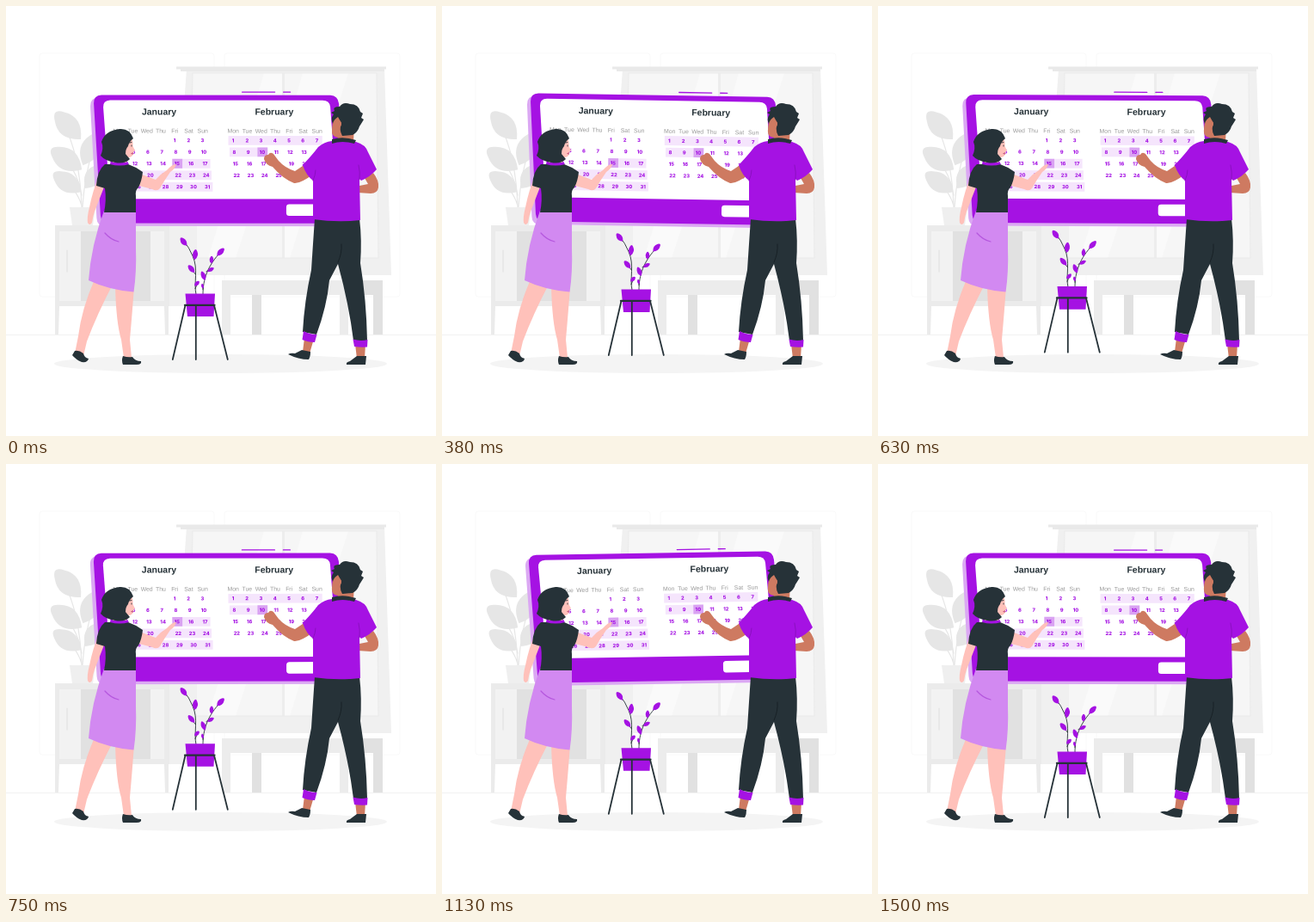
These frames come from a looping animation (500 px wide and 500 px high, 1540 ms). An HTML page:

```html
<!DOCTYPE html>
<html lang="en">
<head>
<meta charset="utf-8">
<title>Calendar planning</title>
<style>
  html, body { margin: 0; width: 100%; height: 100%; overflow: hidden; background: #fff; }
  svg { display: block; width: 100vw; height: 100vh; }
  text { font-family: Arial, "Liberation Sans", sans-serif; text-anchor: middle; }
  .title { font-size: 10.5px; font-weight: 700; fill: #263238; }
  .day { font-size: 6.9px; fill: #999; }
  .num { font: 800 5.8px Inter, Arial, sans-serif; fill: #a512e3; }
  .main { fill: #a512e3; }
  .dark { fill: #263238; }
  .rose { fill: #ffc1ba; }
  .tan { fill: #ce7a61; }
  .line { fill: none; stroke-linecap: round; stroke-linejoin: round; }
</style>
</head>
<body>
<svg viewBox="0 0 500 500">
  <g id="room">
    <path d="M0 382.5H500" stroke="#ececec" stroke-width=".7"/>
    <g fill="none" stroke="#f7f7f7" stroke-width=".7">
      <rect x="39" y="55" width="203" height="283" rx="3"/>
      <rect x="254" y="55" width="204" height="283" rx="3"/>
    </g>
    <!-- window -->
    <path d="M210 73H440L448 313H193Z" fill="#f0f0f0"/>
    <path d="M217 78H431L433 293H212Z" fill="#f6f6f6"/>
    <path d="M300 78H321V130L267 293H235ZM345 78H398L330 293H324V150Z" fill="#fafafa"/>
    <path d="M321 78H324V293H321Z" fill="#ededed"/>
    <path d="M217 78H431L433 293H212Z" fill="none" stroke="#ebebeb" stroke-width="1.2"/>
    <path d="M198 70.5H442V73.5H198ZM203 73.5H440V76H203Z" fill="#e9e9e9"/>
    <!-- cabinet -->
    <path d="M190 255H222V349H190Z" fill="#f0f0f0"/>
    <path d="M57 255H190V349H57Z" fill="#ebebeb"/>
    <path d="M62 262H184V343H62Z" fill="#f2f2f2"/>
    <path d="M87 262H168V343H87Z" fill="#e1e1e1"/>
    <path class="line" d="M71 284V309" stroke="#e1e1e1" stroke-width="1.2"/>
    <path d="M57 349H62L61 382H57ZM184 349H189V382H185Z" fill="#ebebeb"/>
    <!-- bench -->
    <path d="M286 336H297V382H286ZM427 336H438V382H427Z" fill="#e1e1e1"/>
    <path d="M251 319H398V336H251ZM251 336H261V382H251ZM388 336H398V382H388Z" fill="#ececec"/>
    <path d="M398 319H438V336H398Z" fill="#e1e1e1"/>
    <!-- house plant -->
    <path class="line" d="M66 135Q86 172 88 234M58 170Q82 185 88 220M62 198Q82 212 88 232M104 160Q92 190 89 234" stroke="#e6e6e6" stroke-width="1.2"/>
    <g id="bigLeaves" fill="#e6e6e6"></g>
    <path d="M74 234H104L101 255H77Z" fill="#efefef"/>
    <ellipse cx="249.500" cy="416" rx="193.500" ry="11" fill="#f4f4f4"/>
  </g>

  <g id="board">
    <path d="M108 106.500H377Q386 106.500 387 115L396 246Q396 256 387 256H115Q106 256 105.500 247L98 117Q97.500 107 108 106.500Z" fill="#dba8f3"/>
    <path class="main" d="M111 103.600H377Q386 104 387 113.500L396 243Q396.500 252.600 387 252.600H119Q111 252.600 110 244L102 113.500Q101.500 104 111 103.600Z"/>
    <path d="M121 109.700H368Q376 109.700 377 117L385 224.300H121L113 118Q112.500 110 121 109.700Z" fill="#fff"/>
    <rect x="326" y="230.300" width="48" height="13.500" rx="3.500" fill="#fff"/>
    <path class="line" d="M274.500 100H312.500M322.500 100H330.500" stroke="#a512e3" stroke-width="1.300"/>
    <g id="dates"></g>
  </g>

  <g id="stand">
    <path class="line" d="M221 336C218 322 224 306 217 291Q213 281 207 274M219 292L221 287M220 312L214 304M220 329L223 322M229 336C229 318 234 303 250 286M238 298L239 293M233 309L239 306M231 317L228 312M229 330L229 325" stroke="#263238" stroke-width=".9"/>
    <g id="leaves" class="main"></g>
    <path class="main" d="M208.500 334.800H243L241.500 361.400H211Z"/>
    <path class="line" d="M208.500 348.400L193.800 411.400M220.800 348.400V411.400M242 348.400L257.800 411.400" stroke="#263238" stroke-width="1.800"/>
    <path class="line" d="M208 348.200H242.500" stroke="#263238" stroke-width="2.300"/>
  </g>

  <g id="woman">
    <path class="rose" d="M108 198Q101 214 97 234Q94 246 95 252Q97 256 100 252Q101 245 103 239L115 208Z"/>
    <path class="rose" d="M153 194L174 202Q180 195 187 191Q194 183 198 184Q197 189 191 193Q184 203 179 212Q176 216 170 213L151 208Z"/>
    <path class="rose" d="M103 318Q88 352 84 384L80 404L90 407L94 390Q106 358 125 322ZM127 326Q128 368 134 388L137 409H146L144 388Q147 354 149 326Z"/>
    <path class="dark" d="M80 401Q85 400 90 404Q91 409 96 410Q95 415 88 414Q81 411 77 406ZM136 407Q142 409 147 408Q150 413 157 413Q158 417 152 417H136Q134 412 136 407Z"/>
    <path d="M114 238H151V282Q152 309 148.500 332.500Q119 330 96 319Q99 278 114 238Z" fill="#d289f1"/>
    <path class="line" d="M115 264Q122 272 131 274" stroke="#b557de" stroke-width="1.200"/>
    <path class="dark" d="M115 184H142Q151 187 159 193Q158 203 154 211Q150 214 151 221L151 240H114Q117 226 115 212L105 209Q106 191 115 184Z"/>
    <path class="main" d="M121 184L122 179H140L143 184Q132 187 121 184Z"/>
    <path class="rose" d="M124 162L146 153Q148 159 147.500 163L150 168L148 170Q148 176 142 176L140 182H124Z"/>
    <path class="dark" d="M132 143Q144 142 148 154Q143 158 142 163Q139 166 139 172L144 178Q138 184 127 182Q115 180 110 174Q114 165 111 158Q115 145 132 143Z"/>
    <path d="M148 170L145 171.500L147.500 173Z" fill="#c65780"/>
    <path class="line" d="M144 159L146 158.500M146 162V163" stroke="#263238" stroke-width=".9"/>
  </g>

  <g id="man">
    <path class="tan" d="M348 184L336 192Q324 188 317 180L311 172Q307 169 305 173Q300 173 300 178Q302 185 310 187Q322 201 335 206Q342 207 358 195Z"/>
    <path class="tan" d="M417 200L427 194Q434 203 433 211Q432 218 424 218L409 217L411 209L421 207Z"/>
    <path class="tan" d="M347 386L345 402L353 404L358 387ZM406 393L408 410H417L418 393Z"/>
    <path class="dark" d="M359 247H411Q414 272 412 299Q419 341 420 389H404Q399 348 386 300L376 319Q373 350 361 382L345 379Q347 343 355 307Q357 276 359 247Z"/>
    <path class="line" d="M386 298Q391 287 390 277" stroke="#182126" stroke-width="1"/>
    <path class="main" d="M346 378Q353 382 361.500 382L359 391Q351 391 344.500 388ZM403.500 387.500Q412 390 420.500 388L420 396.500Q412 397 405 396Z"/>
    <path class="dark" d="M344 400L354 402Q354 408 352 411Q340 411 328 405Q331 403 336 404ZM408 407H419L418 417H396Q395 414 400 413Z"/>
    <path class="main" d="M379 157Q392 155 407 158Q418 161 421 170L431 190Q423 199 413 203L411 201L412 249Q386 252 357 248V203Q349 197 345 185Q358 171 363 164Q370 158 379 157Z"/>
    <path class="line" d="M411 202Q412 193 410 185M357 203Q360 196 360 191" stroke="#8410b6" stroke-width=".8"/>
    <path class="tan" d="M383 125Q379 136 379 144Q378 152 386 153L385 158H404L405 138L398 128Z"/>
    <path class="dark" d="M379 155Q392 151 407 156L405 160Q391 156 379 160Z"/>
    <path class="dark" d="M378 124L382 122Q379 117 388 117Q392 111 400 114Q410 114 412 123L415 125L413 130L416 132Q413 137 411 140Q409 147 403 150L391 151Q387 144 390 136L386 129Q381 132 380 137Q377 131 381 126Z"/>
    <path class="tan" d="M385 135Q389 131 390 137Q390 141 386 142Z"/>
  </g>
</svg>
<script>
const NS = "http://www.w3.org/2000/svg";
const $ = id => document.getElementById(id);

function add(parent, tag, attrs, label) {
  const el = document.createElementNS(NS, tag);
  for (const key in attrs) el.setAttribute(key, attrs[key]);
  if (label !== undefined) el.textContent = label;
  parent.append(el);
}

// Leaf: centre, half length, half width, tilt
function leaf(parent, [x, y, a, b, tilt]) {
  add(parent, "path", {
    d: `M${-a} 0Q${-a * .2} ${-b * 2} ${a * .65} ${-b * .75}Q${a * 1.25} 0 ${a * .65} ${b * .75}Q${-a * .2} ${b * 2} ${-a} 0Z`,
    transform: `translate(${x} ${y}) rotate(${tilt})`
  });
}
[[72, 139, 22, 10, -133], [70, 178, 22, 10, -146], [71, 205, 20, 9, -146], [98, 166, 21, 9, -66], [102, 198, 17, 8, -55]]
  .forEach(l => leaf($("bigLeaves"), l));
[[206.5, 274.4, 6, 2.6, -126], [220, 289.4, 6.3, 2.5, -85], [215.5, 306, 5.7, 2.4, -130], [222, 323, 4, 1.8, -45],
 [249.5, 286.4, 6.2, 2.5, -47], [239, 295.4, 4.6, 1.9, -88], [238, 307, 4.4, 1.8, -28], [229.5, 314, 5.7, 2.2, -112], [228.5, 326, 3, 1.2, -100]]
  .forEach(l => leaf($("leaves"), l));

const days = ["Mon", "Tue", "Wed", "Thu", "Fri", "Sat", "Sun"];
const step = 16.25, rowStep = 13.5, slant = 1.45;
const dates = $("dates");

function band(x, row, from, to, fill) {
  add(dates, "rect", {
    x: x + row * slant + from * step - 5.7, y: 150.9 + row * rowStep,
    width: (to - from) * step + 11.7, height: 10.8, fill
  });
}

function month(name, titleX, x, first, count) {
  add(dates, "text", { x: titleX, y: 126.5, class: "title" }, name);
  days.forEach((day, i) => add(dates, "text", { x: x + i * step, y: 147.6, class: "day" }, day));
  for (let n = 1; n <= count; n++) {
    const cell = first + n - 1, row = Math.floor(cell / 7);
    add(dates, "text", {
      x: x + (cell % 7) * step + row * slant - .2, y: 158.4 + row * rowStep, class: "num"
    }, n);
  }
}

const janX = 131.2, febX = 264.2, pale = "#f5e5fc", picked = "#d9a2f2";
band(janX, 2, 4, 6, pale);
band(janX, 3, 0, 6, pale);
band(janX, 4, 0, 6, pale);
band(febX, 0, 0, 6, pale);
band(febX, 1, 0, 2, pale);
band(janX, 2, 4, 4, picked);
band(febX, 1, 2, 2, picked);
month("January", 178, janX, 4, 31);
month("February", 311.8, febX, 0, 28);

// 24 poses a second; the swing and the float both last 1.5 s, then one pose holds
const loop = 1540, poseTime = 1000 / 24, poses = 36, lead = .02;

function draw(now) {
  const pose = Math.floor((now % loop + 5) / poseTime);
  const p = (pose / poses + lead) % 1;
  const swing = p < .25 ? 4 * p : p < .75 ? 2 - 4 * p : 4 * p - 4;
  const lift = 10 * (1 - Math.abs(1 - 2 * p));
  $("board").setAttribute("transform", `rotate(${swing} 245 177)`);
  $("stand").setAttribute("transform", `translate(0 ${-lift})`);
}

const start = performance.now();
function tick() {
  draw(performance.now() - start);
  requestAnimationFrame(tick);
}
tick();
</script>
</body>
</html>
```
